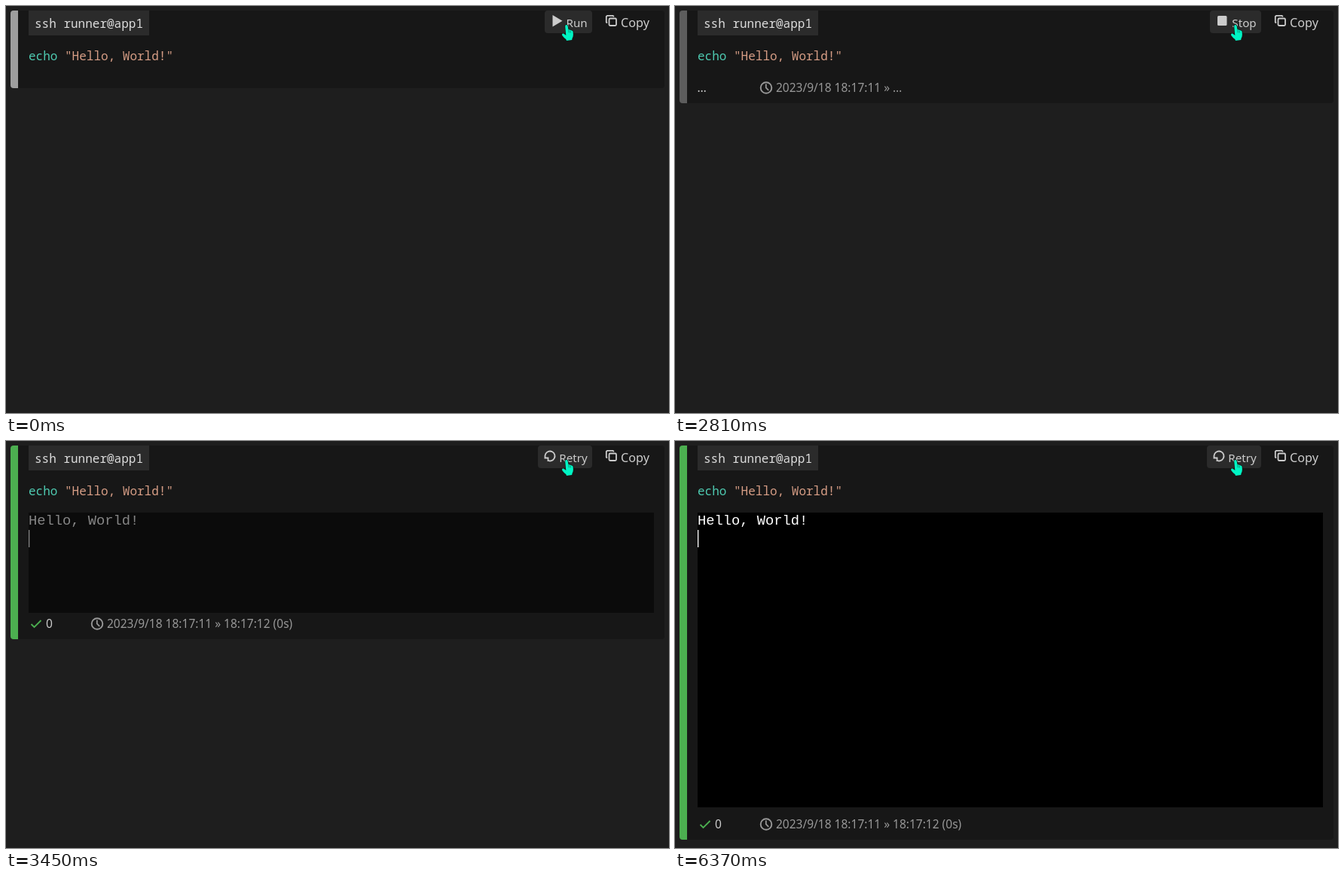
Recreate the animation shown at these times as an HTML page with a canvas. Size 880 px wide and 540 px high, loop 6.5 s.

```html
<!DOCTYPE html>
<html lang="en">
<head>
<meta charset="utf-8">
<title>Run a command</title>
<style>
  html, body { margin: 0; width: 100%; height: 100%; overflow: hidden; background: #1e1e1e; }
  canvas { display: block; }
</style>
</head>
<body>
<canvas id="stage" width="880" height="540"></canvas>
<script>
const ctx = document.getElementById('stage').getContext('2d', { alpha: false });
const LOOP = 6500;
const PRESS = 2460, START = 2530, DIMMED = 3020, BRIGHTEN = 3170, DONE = 3450, OPEN = 3510;
const BLINKS = [3900, 4430, 4910, 5380, 5910, 6370];
const CODE = '16px "Noto Sans Mono", monospace';
const TERMINAL = '18.75px "Liberation Mono", monospace';
const ACTION = '15.2px "Noto Sans", sans-serif';
const LABEL = '16.2px "Noto Sans", sans-serif';
const STATUS = '15.5px "Noto Sans", sans-serif';
const LIGHT = '#cccccc', MUTED = '#989898', GREEN = '#4caf50';

function text(str, x, y, font, color, align = 'left') {
  ctx.font = font;
  ctx.fillStyle = color;
  ctx.textAlign = align;
  ctx.fillText(str, x, y);
}

function box(x, y, w, h, color, radius = 0) {
  ctx.fillStyle = color;
  ctx.beginPath();
  ctx.roundRect(x, y, w, h, radius);
  ctx.fill();
}

function line(points, color, width) {
  ctx.strokeStyle = color;
  ctx.lineWidth = width;
  ctx.beginPath();
  points.forEach(([x, y]) => ctx.lineTo(x, y));
  ctx.stroke();
}

function arc(x, y, r, from, to, color, width) {
  ctx.strokeStyle = color;
  ctx.lineWidth = width;
  ctx.beginPath();
  ctx.arc(x, y, r, from, to);
  ctx.stroke();
}

function barColor(t) {
  if (t < START) return '#9e9e9e';
  if (t >= DONE) return GREEN;
  let level = 66;
  if (t < DIMMED) {
    const step = Math.floor((t - START) / 70) * 70;
    level += 92 * Math.pow(1 - step / (DIMMED - START), 1.43);
  } else if (t >= BRIGHTEN) {
    level += 1.5 * (1 + Math.floor((t - BRIGHTEN) / 70));
  }
  level = Math.round(level);
  return `rgb(${level},${level},${level})`;
}

function drawCopy() {
  ctx.strokeStyle = LIGHT;
  ctx.lineWidth = 1.8;
  ctx.beginPath();
  ctx.roundRect(800.5, 16.5, 9.5, 9.5, 1.5);
  ctx.stroke();
  line([[798, 22.5], [796.8, 21.5], [796.8, 14], [798, 12.9], [805.5, 12.9], [807, 14]], LIGHT, 1.8);
  text('Copy', 816, 28, LABEL, LIGHT);
}

function drawAction(t) {
  const label = t < START ? 'Run' : t < DONE ? 'Stop' : 'Retry';
  const left = { Run: 715, Stop: 710, Retry: 706 }[label];
  const color = t >= PRESS && t < START ? '#ffffff' : LIGHT;
  box(left, 6, 778 - left, 30, '#2b2b2b', 4);
  if (label === 'Run') {
    ctx.fillStyle = color;
    ctx.beginPath();
    ctx.moveTo(725.5, 12);
    ctx.lineTo(738.5, 19.8);
    ctx.lineTo(725.5, 27.5);
    ctx.fill();
  } else if (label === 'Stop') {
    box(720, 13, 12.5, 13, color, 1.5);
  } else {
    arc(722, 20, 6.5, Math.PI * 0.9, Math.PI * 2.65, color, 1.8);
    line([[714.5, 22.5], [719.5, 22.5], [719.5, 27]], color, 1.8);
  }
  text(label, 771.7, 28, ACTION, color, 'right');
}

function drawPointer() {
  const hand = new Path2D(
    'M742.2 27.2 Q742 25 743.8 25 Q745.4 25 745.7 27 L746.5 31.5 ' +
    'Q748 30.7 748.8 32 Q750.2 31.4 750.8 32.8 Q752.3 32.5 752.6 34.2 ' +
    'L752.9 38 Q752.8 41 751.5 43 L751.2 45 L744 46 L743.4 44.2 ' +
    'Q741 42.8 738.4 39.2 Q737.3 37.3 738.7 36.7 Q740 36.3 741.4 37.6 L743.3 39 Z');
  ctx.strokeStyle = '#181818';
  ctx.lineWidth = 1.5;
  ctx.stroke(hand);
  ctx.fillStyle = '#00f5c4';
  ctx.fill(hand);
  line([[746.7, 32], [747.4, 35.5]], '#126b59', 0.7);
  line([[749, 32.5], [749.5, 35.5]], '#126b59', 0.7);
}

function drawOutput(t) {
  const open = t >= OPEN;
  ctx.globalAlpha = open ? 1 : 0.5;
  box(30, 95, 830, open ? 391 : 133, '#000000');
  text('Hello, World!', 30, 111, TERMINAL, '#ffffff');
  const cursorOn = BLINKS.filter(time => t >= time).length % 2 === 0;
  if (cursorOn) box(30, 118, 1.3, 23, '#ffffff');
  ctx.globalAlpha = 1;
}

function drawStatus(t, y) {
  const done = t >= DONE;
  if (done) {
    line([[33.5, y + 0.5], [37.5, y + 4.5], [46.5, y - 4.5]], GREEN, 1.8);
    text('0', 53, y + 5, STATUS, LIGHT);
  } else {
    text('…', 29.5, y + 5, STATUS, LIGHT);
  }
  arc(121, y, 7.3, 0, Math.PI * 2, MUTED, 1.9);
  line([[120.8, y - 5], [120.8, y], [124.2, y + 3.4]], MUTED, 1.8);
  text('2023/9/18 18:17:11 » ' + (done ? '18:17:12 (0s)' : '…'), 134, y + 5, STATUS, MUTED);
}

function draw(t) {
  const bottom = t < START ? 109 : t < DONE ? 129 : t < OPEN ? 263 : 529;
  box(0, 0, 880, 540, '#1e1e1e');
  box(6, 6, 868, bottom - 6, '#171717', 4);
  box(6, 6, 10, bottom - 6, barColor(t), [4, 0, 0, 4]);
  box(30, 6, 160, 33, '#2b2b2b');
  text('ssh runner@app1', 38, 29, CODE, '#dcdcdc');
  text('echo', 30, 72, CODE, '#4ec9b0');
  text('"Hello, World!"', 78, 72, CODE, '#d69d85');
  drawCopy();
  drawAction(t);
  if (t >= DONE) drawOutput(t);
  if (t >= START) drawStatus(t, bottom - 20.5);
  drawPointer();
}

const begin = performance.now();
function frame() {
  draw((performance.now() - begin) % LOOP);
  requestAnimationFrame(frame);
}
frame();
</script>
</body>
</html>
```
